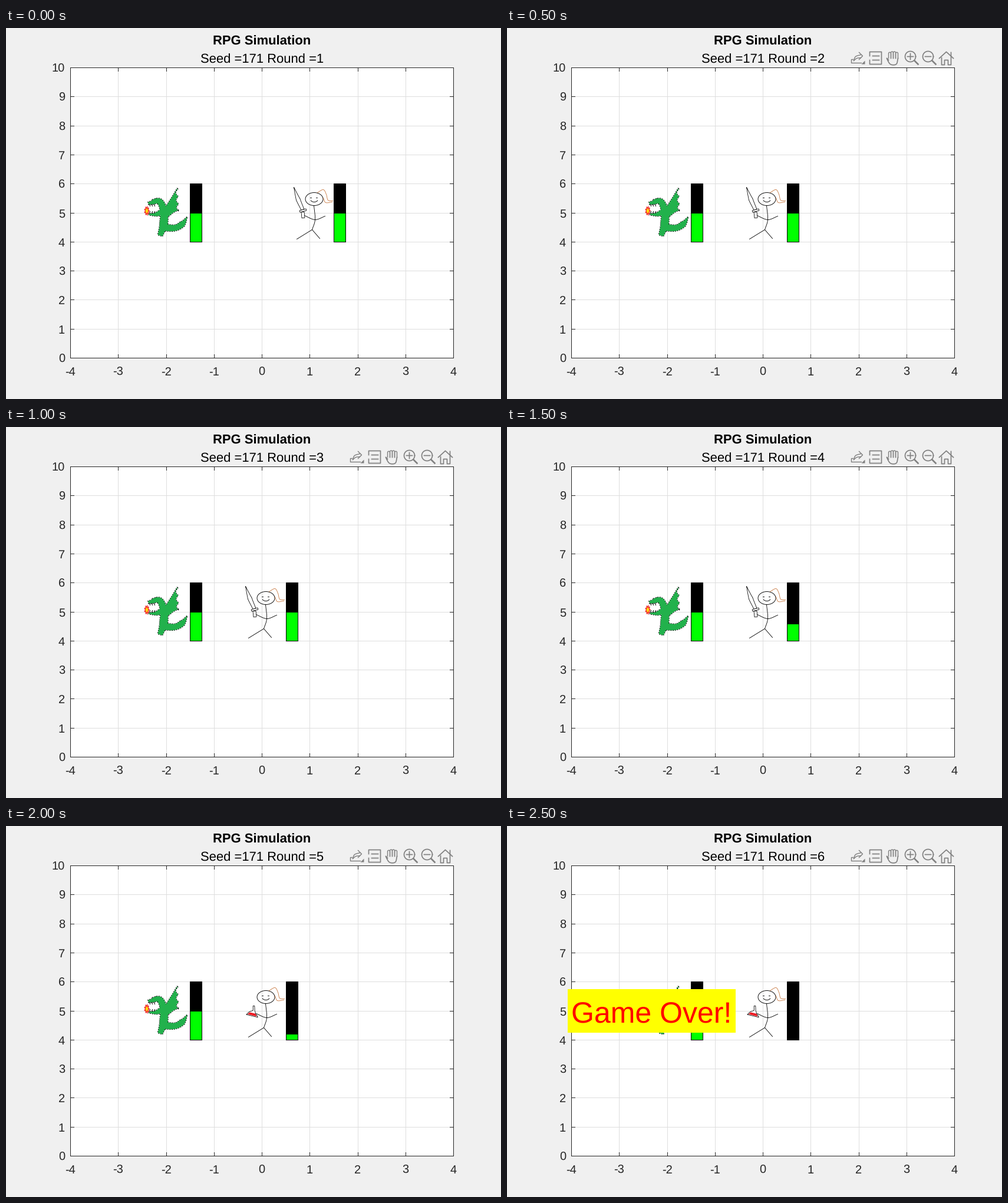
A matplotlib script for the animation above (3 s loop, 840 by 630 pixels).

```python
import matplotlib.pyplot as plt
import numpy as np
from matplotlib.animation import FuncAnimation
from matplotlib.patches import Polygon, Rectangle

W, H, DPI = 840, 630, 100
PX = 72 / DPI
LEFT, RIGHT, TOP, BOTTOM = 109, 759, 67, 560
UNIT_X, UNIT_Y = (RIGHT - LEFT) / 8, (BOTTOM - TOP) / 10
INK, GREY, GREEN, HAIR, RED = "#262626", "#808080", "#22b14c", "#c87941", "#ed1c24"

plt.rcParams.update({
    "font.family": "Liberation Sans",
    "text.hinting": "none",
    "text.hinting_factor": 1,
    "path.snap": False,
})

fig = plt.figure(figsize=(W / DPI, H / DPI), dpi=DPI, facecolor="#f0f0f0")
ax = fig.add_axes([0, 0, 1, 1])


def line(pts, color="black", lw=1.0):
    x, y = np.array(pts, float).T + 0.5
    ax.plot(x, y, color=color, lw=lw * PX, zorder=2)


def shape(pts, fill="none", edge="none", lw=0.8, dots=False):
    style = (0, (1.2, 1)) if dots else "-"
    ax.add_patch(Polygon(np.array(pts) + 0.5, closed=True, fc=fill, ec=edge,
                         lw=lw * PX, ls=style, zorder=2))


def box(x0, y0, x1, y1, fill, edge="none"):
    ax.add_patch(Rectangle((x0 + 0.5, y0 + 0.5), x1 - x0, y1 - y0, fc=fill,
                           ec=edge, lw=PX, joinstyle="miter", zorder=2))


def label(x, y, text, size, color=INK, ha="center", **kw):
    ax.text(x, y, text, fontsize=size * PX, color=color, ha=ha,
            va="baseline", zorder=2, **kw)


def curve(pts, steps=10):
    """Catmull-Rom spline through the points."""
    p = np.array(pts, float)
    p = np.vstack([2 * p[0] - p[1], p, 2 * p[-1] - p[-2]])
    t = np.linspace(0, 1, steps)[:, None]
    return np.vstack([
        0.5 * (2 * b + (c - a) * t + (2 * a - 5 * b + 4 * c - d) * t ** 2
               + (3 * b - a - 3 * c + d) * t ** 3)
        for a, b, c, d in zip(p, p[1:], p[2:], p[3:])])


def ellipse(x, y, rx, ry, a0=0, a1=360):
    a = np.radians(np.linspace(a0, a1, 40))
    return np.column_stack([x + rx * np.cos(a), y + ry * np.sin(a)])


def ribbon(pts, widths):
    """Outline around a spline whose half width changes along the way."""
    mid = curve(pts)
    step = np.gradient(mid, axis=0)
    step /= np.hypot(*step.T)[:, None]
    side = np.column_stack([-step[:, 1], step[:, 0]])
    s = np.linspace(0, len(widths) - 1, len(mid))
    side *= np.interp(s, range(len(widths)), widths)[:, None]
    return np.vstack([mid + side, (mid - side)[::-1]])


def draw_axes():
    box(LEFT, TOP, RIGHT, BOTTOM, "white")
    xs = [round(LEFT + UNIT_X * k + 0.01) for k in range(9)]
    ys = [round(BOTTOM - UNIT_Y * k + 0.01) for k in range(11)]
    for x in xs:
        line([(x, TOP), (x, BOTTOM)], "#dedede")
    for y in ys:
        line([(LEFT, y), (RIGHT, y)], "#dedede")
    for k, x in enumerate(xs):
        line([(x, TOP), (x, TOP + 6)], INK)
        line([(x, BOTTOM), (x, BOTTOM - 6)], INK)
        label(x, 590, str(k - 4), 20)
    for k, y in enumerate(ys):
        line([(LEFT, y), (LEFT + 6, y)], INK)
        line([(RIGHT, y), (RIGHT - 6, y)], INK)
        label(100, y + 8, str(k), 20, ha="right")
    box(LEFT, TOP, RIGHT, BOTTOM, "none", INK)


def draw_bar(x, health):
    x0 = LEFT + (x + 4) * UNIT_X
    x0, x1 = round(x0), round(x0 + UNIT_X / 4)
    box(x0, 264, x1, 363, "black", "black")
    if health > 0:
        box(x0, round(363.2 - UNIT_Y * health), x1, 363, "lime", "black")


def draw_flame():
    a = np.linspace(0, 2 * np.pi, 18, endpoint=False)
    spikes = np.where(np.arange(18) % 2, 0.65, 1)
    for size, color in [(1, RED), (0.65, "#ff9a27"), (0.35, "#fff200")]:
        shape(np.column_stack([238.5 + size * 5 * spikes * np.cos(a),
                               310 + size * 9 * spikes * np.sin(a)]), color)


def draw_dragon():
    t = np.linspace(0, 1, 31)
    feathers = np.column_stack([291 + 2 * t - 4 * abs(np.sin(3 * np.pi * t)),
                                273 + 38 * t])
    feathers[:, 1] -= 3 * (t == 1)
    parts = [
        ribbon([(248, 294), (260, 294), (267, 309), (267, 332), (261, 352)],
               [3, 5, 6, 7, 4]),
        ribbon([(266, 338), (286, 339), (299, 332), (307, 320)],
               [6, 5, 5, 0]),
        ribbon([(264, 312), (254, 316), (242, 316)], [5, 3, 1]),
        ribbon([(256, 293), (247, 296), (241, 297)], [4, 3, 2]),
        np.vstack([curve([(270, 304), (279, 290), (290, 272)]), feathers,
                   curve([(283, 313), (277, 318), (268, 324)])]),
    ]
    for part in parts:
        shape(part, edge="black", lw=1.7, dots=True)
    for part in parts:
        shape(part, GREEN)
    for x in (243, 247, 251):
        line([(x, 299), (x + 1, 302)])
        line([(x, 314), (x + 1, 311)])
    draw_flame()


def draw_hero(x, potion):
    def at(pts):
        return np.array(pts) + [x, 0]

    def pen(pts, color="black"):
        line(at(curve(pts)), color, 0.85)

    def outline(pts, widths, fill="none", edge="black"):
        shape(at(ribbon(pts, widths)), fill, edge)

    shape(at(ellipse(47.5, 290, 15, 11)), edge="black", lw=0.9)
    for eye in (41, 51):
        line(at([(eye, 288), (eye + 2, 288)]), lw=0.9)
    line(at(ellipse(47.5, 291, 6, 4, 20, 160)), lw=0.9)
    pen([(53, 279), (63, 274), (68, 282), (71, 292), (79, 293)], HAIR)
    pen([(63, 288), (67, 296), (78, 295)], HAIR)

    pen([(47, 301), (49, 325), (44, 342)])
    for foot in [(18, 358), (57, 357)]:
        pen([(44, 342), foot])
    pen([(66, 319), (49, 325), (31, 318)])
    if potion:
        outline([(27, 305), (27, 313), (25, 318), (24, 322)],
                [1.3, 1.5, 7, 10], "white")
        outline([(25, 317), (24, 321)], [5, 8], RED, "none")
    else:
        outline([(13, 270), (20, 290), (28, 308)], [0, 3.5, 2.5])
        outline([(23, 311), (34, 308)], [1.5, 1.5], "white")
        outline([(28, 312), (29, 322)], [2.5, 2.5], "white")


def icon(*strokes, lw=1.7):
    for pts in strokes:
        line(pts, GREY, lw)


def draw_toolbar():
    # export
    icon([(587, 53), (584, 53), (584, 59), (601, 59)],
         curve([(588, 55), (591, 48), (600, 45)]),
         curve([(588, 55), (593, 51), (600, 50)]),
         [(597, 41), (603, 47), (597, 53)], lw=1.4)
    shape([(601, 61), (607, 61), (607, 55)], GREY)
    # data tips
    icon([(615, 47), (615, 40), (635, 40), (635, 61), (615, 61), (615, 54)])
    icon(*[[(620, y), (631, y)] for y in (47, 54)])
    # pan: four finger arches over a palm
    for k in range(4):
        x, y = 649 + 4 * k, 41 + 1.2 * abs(k - 1.5)
        icon([(x - 2, 51), *ellipse(x, y, 2, 2, 180, 360), (x + 2, 51)],
             lw=1.4)
    icon(curve([(647, 54), (644, 51), (650, 61), (660, 61), (663, 51)]))
    # zoom in and out
    for x in (684, 714):
        icon(ellipse(x, 48, 9, 9), [(x - 5, 48), (x + 5, 48)])
        icon([(x + 7, 55), (x + 13, 61)], lw=2.6)
    icon([(684, 43), (684, 53)])
    # home
    icon([(733, 51), (745, 40), (757, 51)],
         [(737, 50), (737, 62), (742, 62), (742, 54), (748, 54), (748, 62),
          (753, 62), (753, 41)])


def update(i):
    ax.clear()
    ax.set(xlim=(0, W), ylim=(H, 0))
    ax.axis("off")
    draw_axes()
    label(434.5, 29, "RPG Simulation", 22, "black", weight="bold")
    label(434.5, 60, f"Seed =171 Round ={i + 1}", 22, "black")
    if i > 0:
        draw_toolbar()

    # the hero steps in once, then loses health from the fourth round on
    hero_x = 1.5 if i == 0 else 0.5
    health = round(1 - 0.4 * max(0, i - 2), 2)
    draw_dragon()
    draw_bar(-1.5, 1)
    draw_hero(round(LEFT + (hero_x + 3) * UNIT_X), potion=health < 0.5)
    draw_bar(hero_x, health)

    if health < 0:
        box(102.5, 276.5, 387.5, 350.5, "yellow")
        label(109, 335, "Game Over!", 50, "red", ha="left")
    return []


anim = FuncAnimation(fig, update, frames=6, interval=500, repeat=True,
                     repeat_delay=0, init_func=lambda: update(0))
plt.show()
```
